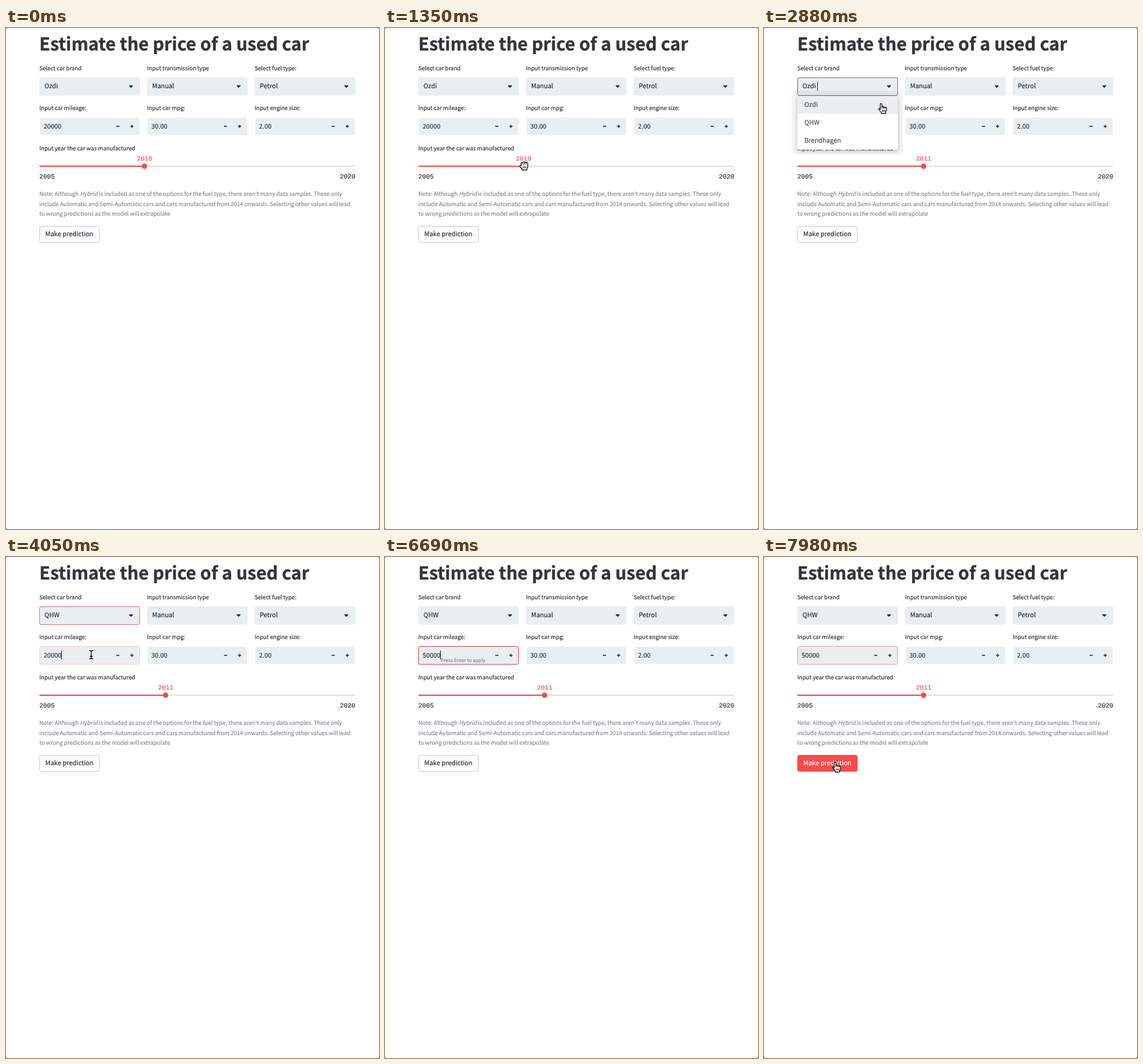
Animation of 582 by 782 pixels, one loop 8 s. Source, as an HTML page:

```html
<!DOCTYPE html>
<html lang="en">
<head>
<meta charset="utf-8">
<title>Used car price form</title>
<style>
html, body { margin: 0; width: 100%; height: 100%; overflow: hidden; background: #fff; }
svg { display: block; width: 582px; height: 782px; }
text { font-family: "Noto Sans CJK JP", "Noto Sans CJK SC", "Noto Sans", sans-serif; color: #292b36; fill: currentColor; stroke: currentColor; stroke-width: .15px; text-rendering: geometricPrecision; white-space: pre; }
.mono { font-family: "Liberation Mono", "DejaVu Sans Mono", monospace; font-size: 10px; }
.note { color: #83858d; }
.title { color: #31333f; font-weight: 700; stroke-width: .35px; }
</style>
</head>
<body>
<svg id="stage" viewBox="0 0 582 782"></svg>
<script>
const LOOP = 8000, STEP = 30;
const RED = '#e9504c', FIELD = '#e9eef1', INK = '#292b36';
const BRANDS = ['Ozdi', 'QHW', 'Brendhagen'];
const BODY = 10.03, SMALL = 8.77;
const stage = document.getElementById('stage');

function add(tag, attrs, parent = stage) {
  const el = document.createElementNS('http://www.w3.org/2000/svg', tag);
  set(el, attrs);
  parent.appendChild(el);
  return el;
}
function set(el, attrs) {
  for (const key in attrs) el.setAttribute(key, attrs[key]);
}
function label(x, y, str, size = SMALL, attrs = {}, parent = stage) {
  const el = add('text', { x, y, 'font-size': size, ...attrs }, parent);
  el.textContent = str;
  return el;
}
function box(x, y, width, height, attrs, parent = stage) {
  return add('rect', { x, y, width, height, ...attrs }, parent);
}
function path(d, attrs, parent = stage) {
  return add('path', { d, fill: 'none', ...attrs }, parent);
}
const show = (el, on) => set(el, { visibility: on ? 'visible' : 'hidden' });
const between = (t, a, b) => t >= a && t < b;
const ramp = (t, start, span) => Math.min(1, Math.max(0, (t - start) / span));

// Page
box(0, 0, 582, 782, { fill: '#777' });
box(0, 0, 582, 782, { fill: '#fff', rx: 3 });
label(52, 35, 'Estimate the price of a used car', 27.55, { class: 'title' });

function select(x, title, value) {
  label(x, 66, title);
  box(x, 77, 157, 28.6, { rx: 3, fill: FIELD });
  path(`M${x + 140} 90h6l-3 3z`, { fill: INK, stroke: INK, 'stroke-width': 1, 'stroke-linejoin': 'round' });
  return label(x + 8, 94.4, value, BODY);
}
function numberInput(x, title, value) {
  label(x, 128, title);
  box(x + 1, 140, 155, 27, { rx: 2.5, fill: FIELD });
  path(`M${x + 120} 153.5h5M${x + 142} 153.5h5m-2.5 -2.5v5`, { stroke: INK, 'stroke-width': 1.3 });
  return label(x + 6.8, 157.2, value, BODY);
}
function focusRing(y, height) {
  return box(52.5, y + .5, 156, height - 1, { rx: 2.5, fill: 'none', stroke: '#dc4f4f' });
}
const brand = select(52, 'Select car brand', BRANDS[0]);
select(220, 'Input transmission type', 'Manual');
select(388, 'Select fuel type:', 'Petrol');
const selection = box(59, 147, 28, 13, { fill: '#b3d4f8' });
const mileage = numberInput(52, 'Input car mileage:', '20000');
stage.insertBefore(selection, mileage);
numberInput(220, 'Input car mpg:', '30.00');
numberInput(388, 'Input engine size:', '2.00');
const hint = label(87, 164.2, 'Press Enter to apply', 7.52, { class: 'note' });
const mileageCaret = box(86, 146, 1, 14, { fill: INK });
const brandRing = focusRing(77, 29);
const mileageRing = focusRing(139, 29);

// Year slider
label(52, 191, 'Input year the car was manufactured');
box(52, 214.8, 493, 2, { rx: 1, fill: '#dddfe2' });
const fill = box(52, 214.8, 164, 2, { rx: 1, fill: RED });
const halo = add('circle', { cy: 215.8, r: 6, fill: RED, opacity: .45 });
const thumb = add('circle', { cy: 215.8, r: 4.2, fill: RED });
const year = label(0, 207.2, '2010', 10, { class: 'mono', 'text-anchor': 'middle', style: `color:${RED}` });
label(52, 235, '2005', 10, { class: 'mono' });
label(545, 235, '2020', 10, { class: 'mono', 'text-anchor': 'end' });

// Note and button
const note = label(52, 261.8, 'Note: Although ', SMALL, { class: 'note' });
const italic = add('tspan', { 'font-style': 'italic' }, note);
italic.textContent = 'Hybrid';
note.append(" is included as one of the options for the fuel type, there aren't many data samples. These only");
label(52, 277.5, 'include Automatic and Semi-Automatic cars and cars manufactured from 2014 onwards. Selecting other values will lead', SMALL, { class: 'note' });
label(52, 293.1, 'to wrong predictions as the model will extrapolate', SMALL, { class: 'note' });
const button = box(52.5, 309.5, 93, 25, { rx: 2.5 });
const buttonText = label(61.3, 325.2, 'Make prediction', BODY);

// Open brand menu
const menu = add('g', {});
path('M52 98H208Q217 98 217 107V189Q217 198 208 198H52Q43 198 43 189V107Q43 98 52 98ZM52 106V190H209V106Z',
  { fill: '#000', 'fill-rule': 'evenodd', opacity: .04 }, menu);
box(52, 106, 157, 84, { rx: 3, fill: '#fff', style: 'filter:drop-shadow(0 2px 3px rgba(0,0,0,.24))' }, menu);
const highlight = box(52, 106, 157, 28, { fill: FIELD }, menu);
BRANDS.forEach((name, i) =>
  label(63, 123.2 + 28 * i, name, BODY, { 'font-weight': 500, style: 'color:#484a54' }, menu));
const brandCaret = box(83, 84, 1, 14, { fill: INK });

// Pointers, each drawn around its own centre or tip
function pointer(d, lines) {
  const g = add('g', {});
  path(d, { fill: '#fff', stroke: '#000', 'stroke-width': 1.1, 'stroke-linejoin': 'round' }, g);
  path(lines, { stroke: '#000', 'stroke-width': .9 }, g);
  return g;
}
const hand = pointer(
  'M-4 2.2V-6.2a1.3 1.3 0 0 1 2.6 0V-1.8a1.2 1.2 0 0 1 2.4 0v.6a1.2 1.2 0 0 1 2.4 0v.6a1.1 1.1 0 0 1 2.3.2V3.4L4.4 5.6V8H-2.4V6.6L-6.4 1.6a1.2 1.2 0 0 1 1.6-1.6Z',
  'M-.8 2.4v3.2M1.2 2.4v3.2M3.2 2.4v3.2M-1.4-2V.6M1-1.4V.6M3.4-.8V.6');
const fist = pointer(
  'M-6 2C-7.2-.2-5.4-1.4-4.4-.2V-4a1.3 1.3 0 0 1 2.4-.6a1.3 1.3 0 0 1 2.6-.2a1.3 1.3 0 0 1 2.5.3a1.3 1.3 0 0 1 2.6.9V2L4.4 4.4V6.6H-3V5Z',
  'M-2-4.4v2.6M.6-4.6v2.8M3.1-4.2v2.4M-1.4 1v2.8M.7 1v2.8M2.8 1v2.8');
const arrow = add('g', {});
path('M0 0V12L2.8 9.4 4.6 13.4 6.4 12.6 4.7 8.8H8.4Z', { fill: '#000', stroke: '#fff' }, arrow);
const beam = add('g', {});
const BEAM = 'M-3-6.5Q0-6.5 0-5Q0-6.5 3-6.5M0-5V5M-3 6.5Q0 6.5 0 5Q0 6.5 3 6.5M-2 2.5h4';
path(BEAM, { stroke: '#fff', 'stroke-width': 2.6 }, beam);
path(BEAM, { stroke: '#000', 'stroke-width': 1.3 }, beam);
const pointers = [arrow, beam, hand, fist];

// [time, x, y]
const ROUTE = [
  [240, 283, 672], [500, 236, 385], [700, 207, 240], [870, 212, 226], [1050, 212, 226],
  [1200, 217, 215], [1350, 217, 215], [1650, 250, 216], [1830, 258, 216], [2130, 258, 134],
  [2310, 197, 94.5], [2500, 196, 93], [2560, 196, 93], [2880, 185.4, 125.4], [2940, 184, 127],
  [3000, 184, 127], [3210, 62, 145], [3510, 62, 145], [3990, 133, 152.5], [4050, 133, 152.5],
  [4230, 37, 152.5], [7110, 37, 152.5], [7320, 190, 320], [7500, 298, 388], [7860, 113.6, 327.6], [8000, 113.6, 327.6]
];
// [start time, shape]
const SHAPES = [
  [0, null], [240, arrow], [1110, fist], [1860, arrow], [2220, beam], [2610, hand], [3570, arrow],
  [3720, beam], [4890, null], [7110, beam], [7170, arrow], [7800, hand]
];
const TYPED = [[0, '20000'], [4890, '5'], [5130, '50'], [5250, '500'], [5460, '5000'], [5790, '50000']];
const latest = (list, t) => list.filter(item => item[0] <= t).pop()[1];

// Speed at a stop; zero where the pointer rests or turns back
function slope(i, axis) {
  const a = ROUTE[i - 1], b = ROUTE[i], c = ROUTE[i + 1];
  if (!a || !c) return 0;
  const before = b[axis] - a[axis], after = c[axis] - b[axis];
  return before * after <= 0 ? 0 : (before + after) / (c[0] - a[0]);
}
function along(t, axis) {
  let i = ROUTE.findIndex(p => p[0] > t) - 1;
  if (i < 0) i = t < ROUTE[0][0] ? 0 : ROUTE.length - 2;
  const p = ROUTE[i], q = ROUTE[i + 1], span = q[0] - p[0], u = ramp(t, p[0], span);
  const u2 = u * u, u3 = u2 * u;
  return (2 * u3 - 3 * u2 + 1) * p[axis] + (u3 - 2 * u2 + u) * span * slope(i, axis)
    + (3 * u2 - 2 * u3) * q[axis] + (u3 - u2) * span * slope(i + 1, axis);
}

function draw(t) {
  const x = along(t, 1), y = along(t, 2), shape = latest(SHAPES, t);
  for (const p of pointers) show(p, p === shape);
  if (shape) set(shape, { transform: `translate(${x.toFixed(2)} ${y.toFixed(2)})` });

  const later = t >= 1500, knob = later ? 249 : 216;
  year.textContent = later ? '2011' : '2010';
  set(year, { x: knob + .3 });
  set(fill, { width: knob - 52 });
  set(thumb, { cx: knob });
  set(halo, { cx: knob });
  show(halo, between(t, 1350, 2520));

  brand.textContent = BRANDS[t < 3510 ? 0 : 1];
  show(menu, between(t, 2520, 3540));
  set(highlight, { y: t >= 3060 ? 134 : 106 });
  show(brandCaret, between(t, 2520, 3030));
  set(brandRing, { opacity: ramp(t, 2460, 120) - ramp(t, 4000, 200) });

  const digits = latest(TYPED, t);
  mileage.textContent = digits;
  set(mileageRing, { opacity: ramp(t, 4000, 200) - ramp(t, 7890, 200) });
  show(hint, between(t, 4890, 6960));
  const left = Math.min(87, Math.max(59, x));
  set(selection, { x: left, width: 87 - left });
  show(selection, between(t, 4080, 4890));
  set(mileageCaret, { x: 58 + 5.6 * digits.length });
  show(mileageCaret, between(t, 4020, 4080) || between(t, 4890, 6240) || between(t, 6690, 7110));

  const hover = t >= 7800, pressed = t >= 7920;
  set(button, { fill: pressed ? '#fb4b4a' : '#fff', stroke: pressed ? '#fb4b4a' : hover ? RED : '#cdced2' });
  buttonText.style.color = pressed ? '#fff' : hover ? RED : INK;
}
function tick() {
  const t = performance.now() % LOOP;
  draw(Math.floor(t / STEP) * STEP);
  requestAnimationFrame(tick);
}
tick();
</script>
</body>
</html>
```
